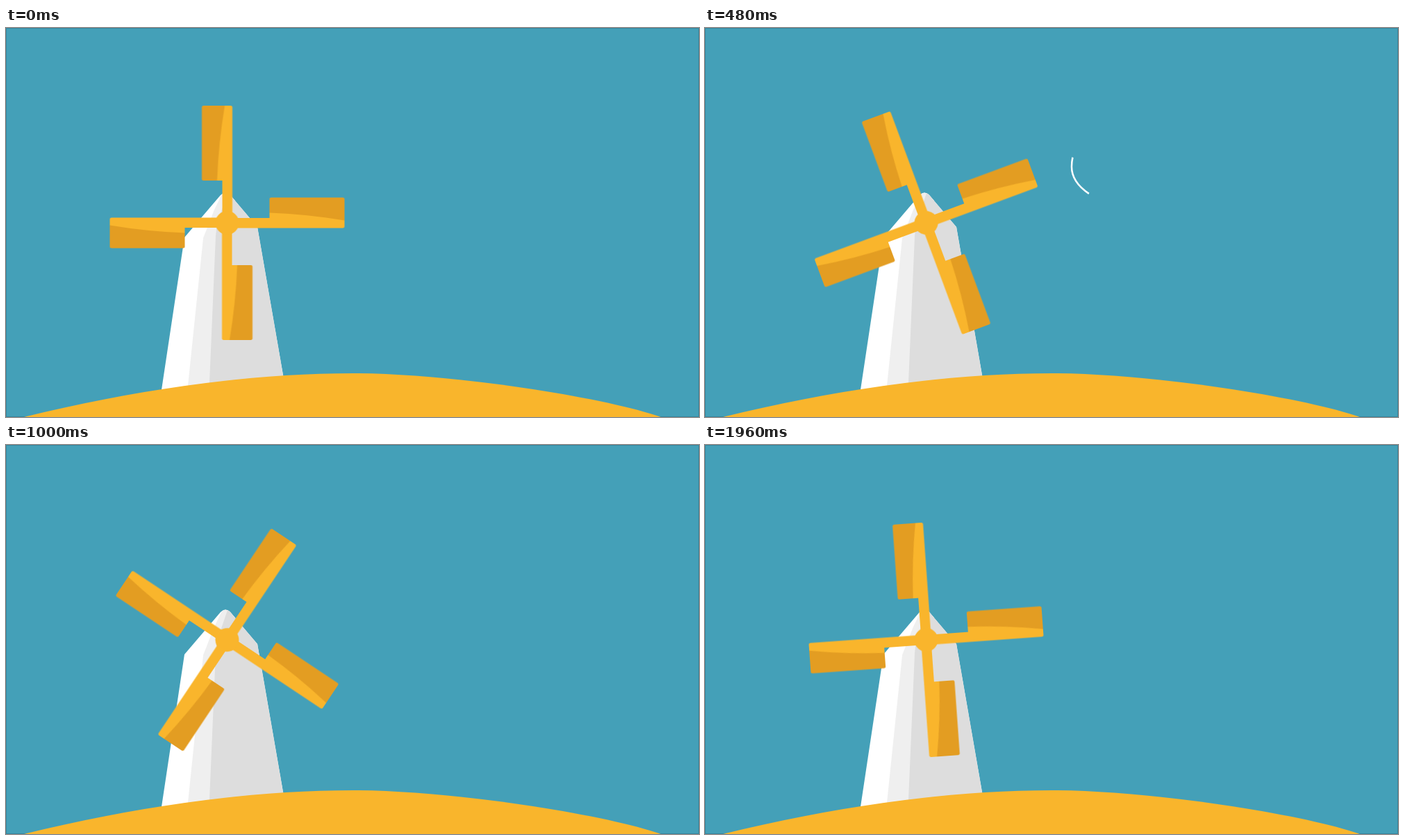
An HTML page that plays this animation: 998x561 px, repeating every 2 s.

```html
<!DOCTYPE html>
<html lang="en">
<head>
<meta charset="utf-8">
<title>Windmill</title>
<style>
  html, body { margin: 0; width: 100%; height: 100%; overflow: hidden; background: #44a0b8; }
  svg { display: block; width: 998px; height: 561px; }
  .gold { fill: #f9b52c; }
  .amber { fill: #e39d22; }
  #rotor { animation: spin 2s cubic-bezier(.4, .165, .25, .576) infinite paused; }
  #wind { fill: none; stroke: #fff; stroke-width: 2.5; stroke-dasharray: 0 3000; }
  @keyframes spin {
    from { transform: rotate(0deg); }
    to { transform: rotate(360deg); }
  }
</style>
</head>
<body>
<svg viewBox="0 0 998 561">
  <defs>
    <g id="sail">
      <rect class="amber" x="-36.5" y="-169" width="40" height="108" rx="2.5"/>
      <path class="gold" d="M-3.5-169H5q2.5 0 2.5 2.5V0H-7V-61H-14.5Q-12.5-115-3.5-169Z"/>
    </g>
  </defs>
  <rect width="998" height="561" fill="#44a0b8"/>
  <rect x=".5" y=".5" width="997" height="560" fill="none" stroke="#34859c"/>

  <!-- tower: lit side, middle facet, shaded side -->
  <path fill="#fff" d="M222 535L257 302L309 241Q316 234 323 241L362 287L405 535Z"/>
  <path fill="#efefef" d="M260 535L284 303L300 262L311 239.500Q317 235 323 241L330 249L310 535Z"/>
  <path fill="#ddd" d="M292 535L302 300L304 282L319 238.300Q321 239 323 241L362 287L405 535Z"/>

  <path class="gold" d="M26 561C190 521 350 498 500 498C640 498 860 532 943 561Z"/>

  <path id="wind"/>

  <g transform="translate(318.5 281)">
    <g id="rotor">
      <use href="#sail"/>
      <use href="#sail" transform="rotate(90)"/>
      <use href="#sail" transform="rotate(180)"/>
      <use href="#sail" transform="rotate(270)"/>
      <circle class="gold" r="17"/>
    </g>
  </g>
</svg>
<script>
  const LOOP = 2000, STEP = 40;
  const wind = document.getElementById('wind');

  // The gust falls in, curls once, then leaves to the right.
  const gust = [
    'M400 0C420 110 480 240 563 232',
    'C590 229 607 215 607 197',
    'C607 170 592 153 569 153S528 172 528 200C528 245 610 275 715 264',
    'C742 262 761 257 774 249',
    'C800 232 825 205 870 205S940 235 1010 225'
  ];

  // Path length at the end of each piece
  const ends = gust.map((_, i) => {
    wind.setAttribute('d', gust.slice(0, i + 1).join(''));
    return wind.getTotalLength();
  });

  const dash = (ms, tail, head) => ({
    offset: ms / LOOP,
    strokeDasharray: `0px ${tail}px ${head - tail}px 3000px`
  });

  const blow = wind.animate([
    dash(0, 0, 0),
    dash(320, ends[0], ends[1]),
    dash(680, ends[2], ends[3]),
    dash(940, ends[4], ends[4] + 60),
    dash(LOOP, ends[4], ends[4] + 60)
  ], { duration: LOOP, iterations: Infinity });
  blow.pause();

  const spin = document.getElementById('rotor').getAnimations()[0];
  const start = performance.now();

  function draw() {
    const t = (performance.now() - start) % LOOP;
    spin.currentTime = blow.currentTime = Math.floor(t / STEP) * STEP;
    requestAnimationFrame(draw);
  }
  draw();
</script>
</body>
</html>
```
